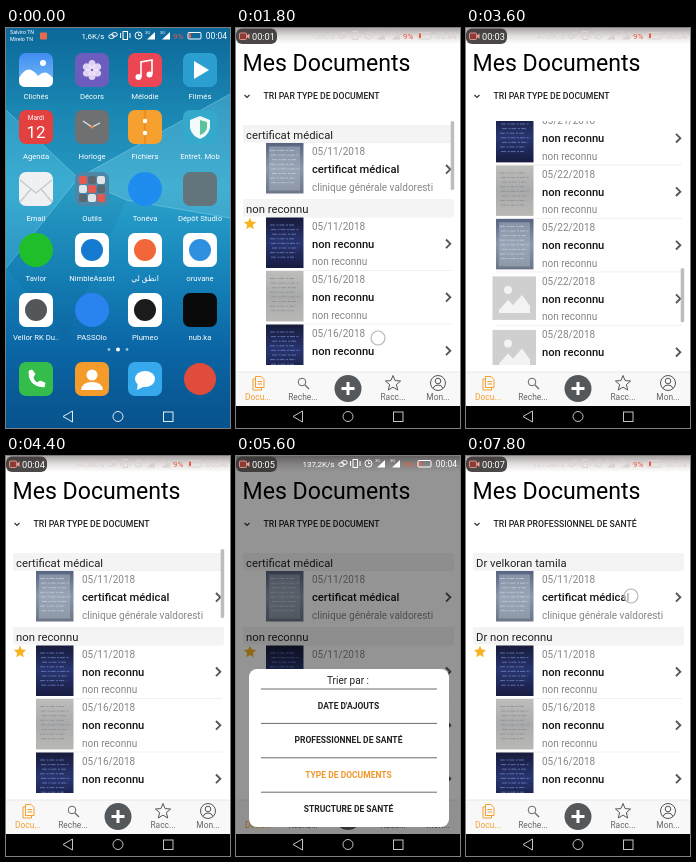
These frames come from a looping animation (224 by 400 pixels, 8000 ms). An HTML page:

```html
<!DOCTYPE html>
<html lang="fr">
<head>
<meta charset="utf-8">
<title>Mes Documents</title>
<style>
  html, body { margin: 0; width: 100%; height: 100%; overflow: hidden; background: #000; }
  svg { display: block; width: 100vw; height: 100vh; }
  text { font-family: Roboto, "Noto Sans", sans-serif; white-space: pre; }
  .mid { text-anchor: middle; }
  .end { text-anchor: end; }
  .app-label { font-size: 7.7px; fill: #fff; text-anchor: middle; }
  .brand { font: 800 28px Inter, sans-serif; fill: #fff; text-anchor: middle; }
  .tagline { font: 700 9.9px Inter, sans-serif; fill: #fff; text-anchor: middle; }
  .title { font-size: 23.1px; fill: #000; }
  .sort { font-size: 8.7px; font-weight: 500; fill: #222; }
  .head { font-size: 11.3px; fill: #222; }
  .date, .sub { font-size: 10px; fill: #858585; }
  .name { font-size: 11.2px; font-weight: 500; fill: #161616; }
  .tab { font-size: 8.4px; fill: #666; text-anchor: middle; }
  .choice { font-size: 8.5px; font-weight: 600; fill: #222; text-anchor: middle; }
  .line { fill: none; stroke: currentColor; }

  .timed { animation: 8s infinite linear; }
  .step { animation-timing-function: step-end; }
  #splash { animation-name: splash; transform-origin: 112px 200px; }
  #docs { animation-name: docs; }
  #pill { animation-name: pill; }
  #status { animation-name: status; }
  #scroll { animation-name: scroll; }
  #bar { animation-name: bar; transform-box: fill-box; transform-origin: 0 0; }
  #touch { animation-name: touch; }
  #dim { animation-name: dim; }
  #sheet { animation-name: sheet; }
  .by-type { animation-name: by-type; }
  .by-doctor { animation-name: by-doctor; }

  @keyframes splash {
    0%, 2.5% { opacity: 0; transform: scale(.5); }
    5%, 100% { opacity: 1; transform: none; }
  }
  @keyframes docs { 0% { opacity: 0; } 15%, 100% { opacity: 1; } }
  @keyframes pill { 0% { opacity: 0; } 2.5%, 100% { opacity: 1; } }
  @keyframes status {
    0% { color: #fff; opacity: 1; }
    5% { color: #fff; opacity: 0; }
    15% { color: #d9d2ce; opacity: 1; }
    66% { color: #fff; opacity: 1; }
    84% { color: #d9d2ce; opacity: 1; }
    100% { color: #d9d2ce; opacity: 1; }
  }
  @keyframes scroll {
    0%, 24% { transform: none; animation-timing-function: ease-in; }
    32.5% { transform: translateY(-877.5px); animation-timing-function: ease-out; }
    37.5%, 41% { transform: translateY(-975px); animation-timing-function: ease-in-out; }
    53%, 100% { transform: none; }
  }
  @keyframes bar {
    0%, 19.9% { opacity: 0; transform: none; }
    20%, 24% { opacity: 1; transform: none; animation-timing-function: ease-in; }
    32.5% { opacity: 1; transform: translateY(173px) scaleY(.72); animation-timing-function: ease-out; }
    37.5%, 41% { opacity: 1; transform: translateY(192px) scaleY(.72); animation-timing-function: ease-in-out; }
    53%, 57% { opacity: 1; transform: none; }
    60%, 100% { opacity: 0; transform: none; }
  }
  @keyframes touch {
    0%, 21.2% { opacity: 0; transform: translate(142px, 310px); }
    21.3%, 24% { opacity: 1; transform: translate(142px, 310px); }
    27% { opacity: 1; transform: translate(146px, 190px); }
    27.1% { opacity: 0; transform: translate(146px, 190px); }
    94.9% { opacity: 0; transform: translate(165px, 140px); }
    95%, 100% { opacity: 1; transform: translate(165px, 140px); }
  }
  @keyframes dim { 0%, 65% { opacity: 0; } 67.5%, 82.5% { opacity: 1; } 85%, 100% { opacity: 0; } }
  @keyframes sheet {
    0%, 65% { transform: translateY(190px); animation-timing-function: ease-out; }
    68%, 82% { transform: none; animation-timing-function: ease-in; }
    85%, 100% { transform: translateY(190px); }
  }
  @keyframes by-type { 0% { opacity: 1; } 85%, 100% { opacity: 0; } }
  @keyframes by-doctor { 0% { opacity: 0; } 85%, 100% { opacity: 1; } }
</style>
</head>
<body>
<svg id="stage" viewBox="0 0 224 400" preserveAspectRatio="none"></svg>
<script>
const rect = (x, y, w, h, fill, r = 0, more = '') =>
  `<rect x="${x}" y="${y}" width="${w}" height="${h}" rx="${r}" fill="${fill}" ${more}/>`;
const dot = (x, y, r, fill) => `<circle cx="${x}" cy="${y}" r="${r}" fill="${fill}"/>`;
const shape = (d, fill, more = '') => `<path d="${d}" fill="${fill}" ${more}/>`;
const stroke = (d, color, width = 1, more = '') =>
  `<path d="${d}" fill="none" stroke="${color}" stroke-width="${width}" ${more}/>`;
const text = (x, y, cls, words, more = '') => `<text x="${x}" y="${y}" class="${cls}" ${more}>${words}</text>`;
const at = (x, y, body) => `<g transform="translate(${x} ${y})">${body}</g>`;
const gradient = (id, stops, dir = 'x1="0" y1="0" x2="0" y2="1"') =>
  `<linearGradient id="${id}" ${dir}>${stops.map((c, i) =>
    `<stop offset="${i / (stops.length - 1)}" stop-color="${c}"/>`).join('')}</linearGradient>`;

function starPath(x, y, r) {
  const points = Array.from({ length: 10 }, (_, i) => {
    const a = i * Math.PI / 5 - Math.PI / 2, d = i % 2 ? r * .45 : r;
    return `${(x + d * Math.cos(a)).toFixed(1)} ${(y + d * Math.sin(a)).toFixed(1)}`;
  });
  return `M${points.join('L')}Z`;
}

const defs = `<defs>
  ${gradient('sky', ['#0d6d9f', '#1d8ebb', '#2ba3cb', '#1786bb', '#0b66a5', '#07528c'])}
  ${gradient('warm', ['#fbc27a', '#fd9468', '#ff5a5e'], 'x1=".75" y1="0" x2=".3" y2="1"')}
  ${gradient('paper', ['#566480', '#8b97ab', '#6c7686'])}
  ${gradient('screen', ['#171a3a', '#28356f', '#171b40'])}
  ${gradient('grey', ['#bdbdba', '#a9aaab', '#b9b8b4'])}
  ${gradient('blue', ['#3f8cf0', '#7cc0fa'])}
  ${gradient('shade', ['#aaa6a6', '#e2dfde', '#fff'])}
  <clipPath id="window"><rect y="93" width="224" height="244"/></clipPath>
</defs>`;

const nav = color =>
  stroke('M57 388.500L66.500 383V394Z', color) +
  `<circle cx="112" cy="388.500" r="5" fill="none" stroke="${color}"/>` +
  rect(157.5, 384, 9.5, 9.5, 'none', 0, `stroke="${color}"`);
const navBar = rect(0, 378, 224, 22, '#000') + nav('#c4c4c4');

// Home screen icons are drawn around their centre.
const tile = fill => rect(-17, -17, 34, 34, fill, 7);
const mark = fill => tile('#fff') + dot(0, 0, 11, fill);
const petals = Array.from({ length: 6 }, (_, i) =>
  `<ellipse cy="-5.500" rx="3.600" ry="4.500" fill="#f3e6fb" opacity=".85" transform="rotate(${i * 60})"/>`).join('');
const folderColors = ['#e6574f', '#dfe5e8', '#5a6771'];
const folder = tile('#4e86a8') + Array.from({ length: 9 }, (_, i) =>
  rect(-13 + i % 3 * 9, -13 + Math.floor(i / 3) * 9, 8, 8, folderColors[(i * 2 + Math.floor(i / 3)) % 3], 2)).join('');
const handset = 'M-7-8Q-8 7 8 8L9 4L4 2L1 4Q-3 1-3-2L-1-5L-4-9Z';

const apps = [
  ['Clichés', tile('url(#blue)') + dot(7, -7, 3, '#fff') + shape('M-17 8Q-8-8 2 6Q9-2 17 8V11Q17 17 10 17H-10Q-17 17-17 11Z', '#fff')],
  ['Décors', tile('#6c5cbd') + petals],
  ['Mélodie', tile('#ec4655') + stroke('M-4 7V-8L7-10V4', '#fff', 1.6) + dot(-6.5, 7, 3, '#fff') + dot(4.5, 4.5, 3, '#fff')],
  ['Filmés', tile('#2b9fd2') + shape('M-6-9L9 0L-6 9Z', '#fff')],
  ['Agenda', tile('#e2413f') + text(0, -7, 'mid', 'Mardi', 'font-size="6.500" fill="#fff"') + text(0, 11, 'mid', '12', 'font-size="17" fill="#fff"')],
  ['Horloge', tile('#6e7072') + stroke('M-9-6L0 0L8-4', '#e4e4e4', 1.3) + dot(0, 0, 1.5, '#f0863b')],
  ['Fichiers', tile('#f5a02f') + stroke('M0-17V17', '#d97f1c') + dot(0, -6, 2.2, '#fff') + dot(0, 6, 2.2, '#fff')],
  ['Entret. Mob', tile('#35a9cb') + shape('M0-11L10-7V1Q8 9 0 12Q-8 9-10 1V-7Z', '#f2fbfa') + shape('M0-7V8Q6 6 7 1V-5Z', '#5cc39a')],
  ['Email', tile('#eef0f2') + stroke('M-16-9L0 4L16-9M-16 13L-5 0M16 13L5 0', '#c3c8cd', 1.2)],
  ['Outils', folder],
  ['Tonéva', dot(0, 0, 17, '#1f8df0')],
  ['Dépôt Studio', tile('#63747d')],
  ['Tavlor', dot(0, 0, 17, '#1fbf2c')],
  ['NimbleAssist', mark('#147bd1')],
  ['انطق لي', mark('#f2673a')],
  ['oruvane', mark('#2f8fe0')],
  ['Vellor RK Du..', mark('#53575a')],
  ['PASSOlo', dot(0, 0, 17, '#2a83ee')],
  ['Plumeo', mark('#1b1b1b')],
  ['nub.ka', tile('#0a0a0a')],
];
const columns = [30, 86, 139, 194], rows = [42, 99, 161, 222, 282];
const labelRows = [71, 131, 192.5, 252.5, 312];
const dock = [
  tile('#35bd4b') + shape(handset, '#fff', 'stroke="#fff"'),
  tile('#f59b2c') + dot(0, -4, 5.5, '#fff') + shape('M-11 11Q-10 3 0 3Q10 3 11 11Z', '#fff'),
  tile('#36a9ec') + `<ellipse rx="10" ry="8" fill="#fff"/>` + shape('M-7 4L-8 11L0 7Z', '#fff'),
  dot(0, 0, 16, '#e04b3c'),
];

const home = rect(0, 0, 224, 400, 'url(#sky)') +
  shape('M0 82L72 150L224 66V0H0Z', '#063f60', 'opacity=".1"') +
  shape('M72 150L224 66V190L120 172Z', '#a5dcec', 'opacity=".2"') +
  shape('M0 82L72 150L0 240Z', '#8fdcf0', 'opacity=".16"') +
  shape('M72 150L120 172L60 310L0 240Z', '#043f6c', 'opacity=".08"') +
  stroke('M0 82L72 150L224 66M72 150L120 172L224 190M72 150L0 240', '#a8ecfa', .7, 'opacity=".5"') +
  apps.map(([label, icon], i) => {
    const x = columns[i % 4], row = Math.floor(i / 4);
    return at(x, rows[row], icon) + text(x, labelRows[row], 'app-label', label);
  }).join('') +
  dock.map((icon, i) => at(columns[i], 351, icon)).join('') +
  [103, 112, 121].map((x, i) => dot(x, 321.5, i === 1 ? 2 : 1.4, i === 1 ? '#fff' : '#8fc4e4')).join('') +
  text(4, 6, '', 'Salviro TN', 'font-size="5.300" fill="#fff"') +
  text(4, 12.5, '', 'Mirelo TN', 'font-size="5.300" fill="#fff"') +
  rect(34, 4.5, 7, 7, '#ea6a4c', 1) +
  nav('#e4eef5');

const splash = rect(0, 0, 224, 378, 'url(#warm)') + dot(113, 158, 31, '#efcba0') +
  text(112, 228, 'brand', 'Oruvane') + text(112, 248, 'tagline', 'Toute votre santé dans vos mains') + navBar;

// Thumbnails: soft photo tones, or a picture placeholder.
function thumb(kind) {
  if (kind === 'none') {
    return rect(26.5, 4.5, 43.5, 43.5, '#cfcfcf') + dot(42, 18, 4, '#f3f3f3') +
      shape('M33 41V38L42 28L47 33L56 23L64 34V41Z', '#f3f3f3');
  }
  const ink = { paper: '#cfd7e2', screen: '#7f93dc', grey: '#85878c' }[kind];
  const rowsOfInk = Array.from({ length: 8 }, (_, i) => `M${34 + i % 3} ${8 + i * 4.6}H${58 + i * 5 % 7}`).join('');
  return rect(30, .5, 37.5, 50.5, `url(#${kind})`) +
    (kind === 'paper' ? rect(33, 4, 31, 44, '#a3adbd', 0, 'opacity=".6"') : '') +
    stroke(rowsOfInk, ink, .9, 'stroke-dasharray="5 1.500 2 1" opacity=".7"');
}

const item = (y, date, name, sub, kind) => at(0, y,
  stroke('M30 0H216', '#ececec', .8) + thumb(kind) +
  text(76, 12.9, 'date', date) + text(76, 30.7, 'name', name) + text(76, 48.2, 'sub', sub) +
  stroke('M210 22.500L214.300 26.800L210 31.100', '#555', 1.9));

const header = (y, words) => rect(7, y, 211, 17.5, '#f4f4f4') + text(10, y + 13.6, 'head', words);
const swap = (cls, body) => `<g class="timed step ${cls}">${body}</g>`;

const days = [11, 16, 16, 16, 17, 17, 17, 18, 18, 18, 21, 21, 21, 22, 22, 22, 28, 29, 30, 30, 30];
function kindOf(i) {
  if (i < 14) return i % 2 ? 'grey' : 'screen';
  return ['paper', 'none', 'none', 'none', 'paper', 'grey', 'none'][i - 14];
}
const list =
  swap('by-type', header(97, 'certificat médical') + header(171, 'non reconnu')) +
  swap('by-doctor', header(97, 'Dr velkoran tamila') + header(171, 'Dr non reconnu')) +
  item(114.5, '05/11/2018', 'certificat médical', 'clinique générale valdoresti', 'paper') +
  days.map((day, i) => item(189 + i * 53.5, `05/${day}/2018`, 'non reconnu', 'non reconnu', kindOf(i))).join('') +
  shape(starPath(14, 196, 6.5), '#f7b322');

const orange = '#f5a02c';
const tabs = rect(0, 337, 224, 41, '#fff') + rect(0, 344, 224, 34, '#f8f8f8') + stroke('M0 344H224', '#e2e2e2', .8) +
  stroke('M19.500 348.500H25L28 351.500V359.500H19.500ZM19.500 351H17V362H25.500V359.500M21.500 353.500H26M21.500 356H26', orange, 1) +
  `<circle cx="66" cy="354" r="3.800" fill="none" stroke="#666"/>` + stroke('M69 357L73 361', '#666', 1.2) +
  dot(112, 360.5, 13.5, '#54585b') + stroke('M112 354V367M105.500 360.500H118.500', '#fff', 3) +
  stroke(starPath(157, 355.5, 8), '#555', 1) +
  `<circle cx="202" cy="355" r="7.500" fill="none" stroke="#555"/><circle cx="202" cy="353" r="2.800" fill="none" stroke="#555"/>` +
  stroke('M197 360.500Q198 357 202 357Q206 357 207 360.500', '#555') +
  text(22, 372, 'tab', 'Docu...', `style="fill:${orange}"`) + text(67, 372, 'tab', 'Reche...') +
  text(157, 372, 'tab', 'Racc...') + text(202, 372, 'tab', 'Mon...');

const choices = ["DATE D'AJOUTS", 'PROFESSIONNEL DE SANTÉ', 'TYPE DE DOCUMENTS', 'STRUCTURE DE SANTÉ'];
const sheet = rect(13, 213, 200, 158, '#fff', 8) +
  text(112, 228, 'mid', 'Trier par :', 'font-size="10" fill="#222"') +
  choices.map((words, i) => stroke(`M25 ${233 + i * 34.4}H201`, '#444', .8) +
    text(112.5, 253 + i * 34.4, 'choice', words, i === 2 ? 'style="fill:#f0962a"' : '')).join('');

const docs = rect(0, 0, 224, 400, '#fff') + rect(0, 0, 224, 16, 'url(#shade)') +
  text(6.5, 43, 'title', 'Mes Documents') + stroke('M8.500 67L11 69.500L13.500 67', '#333', 1.2) +
  swap('by-type', text(27.5, 71, 'sort', 'TRI PAR TYPE DE DOCUMENT')) +
  swap('by-doctor', text(27.5, 71, 'sort', 'TRI PAR PROFESSIONNEL DE SANTÉ')) +
  `<g clip-path="url(#window)"><g id="scroll" class="timed">${list}</g></g>` +
  rect(214.7, 93, 3.5, 69, '#bdbdbd', 1.5, 'id="bar" class="timed"') + tabs +
  `<g id="touch" class="timed"><circle r="7" fill="#fff" fill-opacity=".6" stroke="#b5b5b5" stroke-width="1.200"/></g>` +
  rect(0, 0, 224, 378, '#000', 0, 'id="dim" class="timed" fill-opacity=".42"') +
  `<g id="sheet" class="timed">${sheet}</g>` + navBar;

const status = text(98.5, 10.5, 'end', '', 'id="rate" font-size="8" fill="currentColor"') +
  `<g class="line"><ellipse cx="105.500" cy="8.500" rx="2.800" ry="2"/><ellipse cx="108.500" cy="6.500" rx="2.800" ry="2"/>
  <rect x="117" y="3.500" width="4.500" height="8"/><path d="M114.500 5V10M124 5V10"/>
  <circle cx="132.500" cy="7.500" r="3.500"/><path d="M132.500 5.500V7.500H134.500"/></g>` +
  [147, 162].map(x => text(x - 8, 6, '', '3G', 'font-size="4" fill="currentColor"') +
    shape(`M${x - 6} 11.500H${x + 2}V4Z`, 'currentColor')).join('') +
  text(167, 10.5, '', '9%', 'font-size="8" fill="#ee5a45"') +
  rect(182, 4.5, 13, 6.5, 'none', 1, 'stroke="currentColor"') + rect(183, 5.5, 2, 4.5, '#ee5a45') +
  text(221, 10.5, 'end', '00:04', 'font-size="8.500" fill="currentColor"');

const pill = rect(0, .5, 41, 15.5, '#3a3535', 6, 'fill-opacity=".9"') +
  rect(3.5, 5, 7, 6.5, '#8e3a35', 1, 'stroke="#f0a79e" stroke-width=".8"') + shape('M11 7.500L13.500 5.500V11L11 9Z', '#f0a79e') +
  text(16, 11.5, '', '', 'id="clock" font-size="9.200" fill="#fff"');

document.getElementById('stage').innerHTML = defs + home +
  `<g id="splash" class="timed">${splash}</g><g id="docs" class="timed step">${docs}</g>` +
  `<g id="status" class="timed step">${status}</g><g id="pill" class="timed step">${pill}</g>`;

const clock = document.getElementById('clock'), rate = document.getElementById('rate');
const rates = [[7400, '127,2K/s'], [5000, '137,2K/s'], [2400, '47,0K/s'], [0, '1,6K/s']];
let start;
function tick(now) {
  start ??= now;
  const t = (now - start) % 8000;
  clock.textContent = `00:0${Math.floor(t / 1000)}`;
  rate.textContent = rates.find(([from]) => t >= from)[1];
  requestAnimationFrame(tick);
}
requestAnimationFrame(tick);
</script>
</body>
</html>
```
